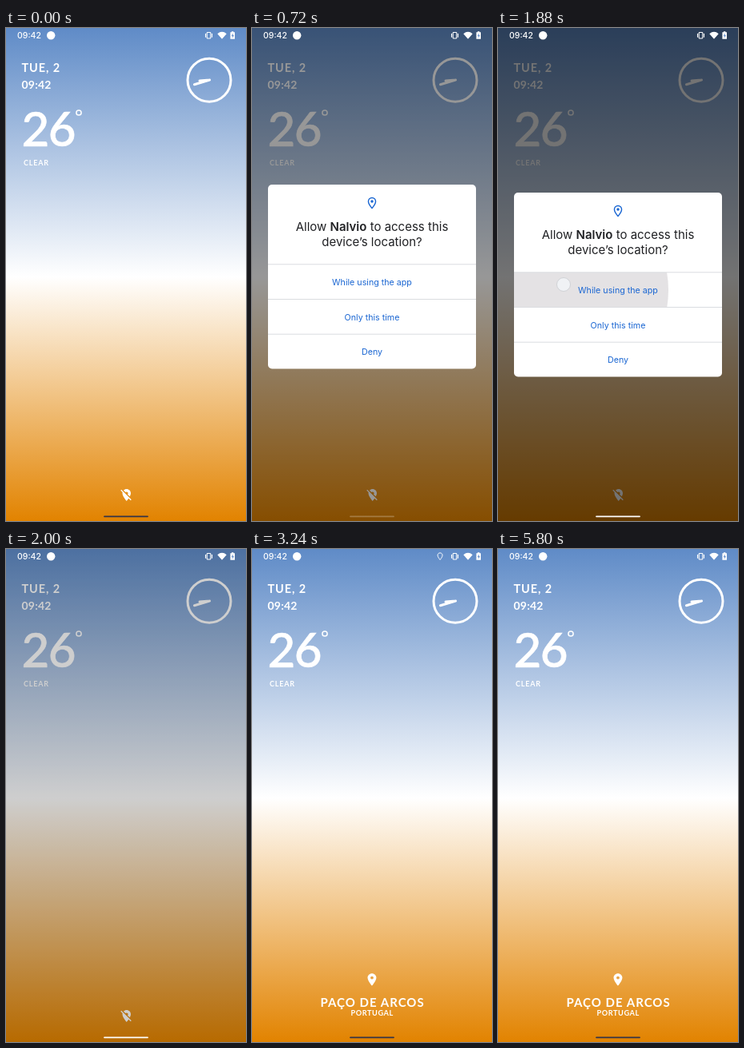
An HTML page that plays this animation: 300x617 px, repeating every 7760 ms.

```html
<!DOCTYPE html>
<html lang="en">
<head>
<meta charset="utf-8">
<title>Weather location permission</title>
<style>
  html, body { margin: 0; width: 100%; height: 100%; overflow: hidden; }
  svg { display: block; width: 100vw; height: 100vh; }
  .app { font-family: Lato, sans-serif; font-weight: 700; fill: #fff; }
  .system { font-family: Inter, sans-serif; font-weight: 500; }
  .center { text-anchor: middle; }
  .line { fill: none; stroke: #fff; stroke-linecap: round; }
</style>
</head>
<body>
<svg viewBox="0 0 300 617">
  <defs>
    <linearGradient id="sky" x2="0" y2="1">
      <stop offset="0" stop-color="#5f8bc7"/>
      <stop offset=".505" stop-color="#fff"/>
      <stop offset="1" stop-color="#e28300"/>
    </linearGradient>
    <clipPath id="firstRow"><rect x="20" y="306" width="260" height="43"/></clipPath>
    <path id="drop" d="M12 2C8.13 2 5 5.13 5 9c0 5.25 7 13 7 13s7-7.75 7-13c0-3.87-3.13-7-7-7z"/>
    <path id="pin" fill-rule="evenodd" d="M12 2C8.13 2 5 5.13 5 9c0 5.25 7 13 7 13s7-7.75 7-13c0-3.87-3.13-7-7-7zm0 9.5a2.5 2.5 0 1 1 0-5 2.5 2.5 0 0 1 0 5z"/>
  </defs>

  <rect width="300" height="617" fill="url(#sky)"/>

  <g class="app">
    <text x="19.5" y="55" font-size="14.5" letter-spacing=".9">TUE, 2</text>
    <text x="19.5" y="76" font-size="14" letter-spacing=".2">09:42</text>
    <text x="19.5" y="148" font-size="60" letter-spacing="-1.6" font-weight="500" stroke="#fff" stroke-width=".7">26</text>
    <text x="22" y="171.5" font-size="9" letter-spacing=".8">CLEAR</text>
    <circle class="line" cx="91" cy="106" r="3.1" stroke-width="1.5"/>
    <circle class="line" cx="254" cy="65.2" r="27" stroke-width="3"/>
    <path class="line" d="M254.5 65L242 66M254.5 65L235.5 70.8" stroke-width="3"/>

    <path id="pinOff" transform="translate(141.75 575.5) scale(.75)" d="M12 6.5c1.38 0 2.5 1.12 2.5 2.5 0 .74-.33 1.39-.83 1.85l3.63 3.63c.98-1.86 1.7-3.8 1.7-5.48 0-3.87-3.13-7-7-7-1.98 0-3.76.83-5.04 2.15l3.19 3.19c.46-.52 1.11-.84 1.85-.84zm4.37 9.6l-4.74-4.74L3.27 3 2 4.27l3.18 3.18C5.07 7.95 5 8.47 5 9c0 5.25 7 13 7 13s1.67-1.85 3.38-4.35L18.73 21 20 19.73l-3.63-3.63z"/>
    <g id="place">
      <use href="#pin" transform="translate(140.6 529.6) scale(.78)"/>
      <text class="center" x="150.6" y="573" font-size="15" letter-spacing="1">PAÇO DE ARCOS</text>
      <text class="center" x="150.2" y="584.3" font-size="9.2" letter-spacing=".55">PORTUGAL</text>
    </g>
  </g>

  <rect id="dim" width="300" height="617"/>

  <g id="dialog" class="system">
    <rect x="20" y="206" width="260" height="230.5" rx="5" fill="#fff"/>
    <g transform="translate(142.2 221.2) scale(.65)">
      <use href="#drop" fill="none" stroke="#1a66d2" stroke-width="2.2"/>
      <circle cx="12" cy="9" r="2.6" fill="#1a66d2"/>
    </g>
    <g class="center" fill="#202124" font-size="15" font-weight="400">
      <text x="150" y="263.5">Allow <tspan font-weight="600">Nalvio</tspan> to access this</text>
      <text x="150" y="283">device’s location?</text>
    </g>
    <g clip-path="url(#firstRow)"><circle id="ripple" cx="82" cy="328" fill="#e4e2e4"/></g>
    <path d="M20 305.8H280M20 349.5H280M20 393.2H280" stroke="#dadce0"/>
    <g class="center" fill="#1a66d2" font-size="10.7" font-weight="400">
      <text x="150" y="331.8">While using the app</text>
      <text x="150" y="375.5">Only this time</text>
      <text x="150" y="419">Deny</text>
    </g>
  </g>

  <circle id="touch" cx="82" cy="321" r="8.5" fill="#f0f2f5" stroke="#d0d2d6"/>

  <g fill="#fff" class="system">
    <text x="14" y="13.2" font-size="10.5">09:42</text>
    <circle cx="56.2" cy="9.3" r="5.2"/>
    <use id="statusPin" href="#drop" transform="translate(229.9 4) scale(.43)" fill="none" stroke="#fff" stroke-width="2.2"/>
    <g class="line" stroke-width="1.1">
      <rect x="251.2" y="5.5" width="4.6" height="7.5" rx=".8"/>
      <path d="M249.5 7.2V11.3M257.5 7.2V11.3"/>
    </g>
    <path d="M264.3 7.2Q270 2.4 275.7 7.2L270 13.8Z"/>
    <path d="M282 4.3h2.4v1h1.6v8.5h-5.6V5.3H282Z"/>
    <path d="M283.8 6.6l-2 3.3h1.2v2.6l2-3.4h-1.2Z" fill="#6a92cc"/>
  </g>
  <path id="homeBar" d="M123 611.3H177" stroke-width="1.8" stroke-linecap="round"/>
</svg>
<script>
const LOOP = 7760;
const el = id => document.getElementById(id);
const clamp = x => Math.min(1, Math.max(0, x));
const ramp = (t, from, to) => clamp((t - from) / (to - from));
const ease = (t, from, to) => { const x = ramp(t, from, to); return x * x * (3 - 2 * x); };
const pulse = (t, inStart, inEnd, outStart, outEnd) => ease(t, inStart, inEnd) - ease(t, outStart, outEnd);
const fade = (id, alpha) => el(id).setAttribute('opacity', alpha.toFixed(3));

function homeBar(t) {
  const light = t >= 600 && t < 2800;
  el('homeBar').setAttribute('stroke', light ? '#fff' : '#343449');
  if (!light) return t < 2800 ? 1 - ramp(t, 440, 600) : ramp(t, 2800, 2960);
  return ramp(t, 640, 960) * (1 - .5 * ramp(t, 2200, 2480)) * (1 - ramp(t, 2680, 2800));
}

function draw(t) {
  fade('dim', .55 * pulse(t, 480, 840, 1880, 2080));
  fade('dialog', pulse(t, 480, 680, 1880, 1980));
  el('dialog').setAttribute('transform', `translate(0 ${-10 * (1 - ease(t, 760, 960))})`);
  el('ripple').setAttribute('r', 131 * Math.max(0, t - 1720) / 160);
  fade('touch', pulse(t, 1640, 1720, 1900, 1980));
  fade('statusPin', pulse(t, 2200, 2320, 3320, 3440));
  fade('pinOff', 1 - ease(t, 2720, 2960));
  fade('place', ease(t, 2880, 3240));
  fade('homeBar', homeBar(t));
}

let start;
function tick(now) {
  start ??= now;
  draw((now - start) % LOOP);
  requestAnimationFrame(tick);
}
draw(0);
requestAnimationFrame(tick);
</script>
</body>
</html>
```
